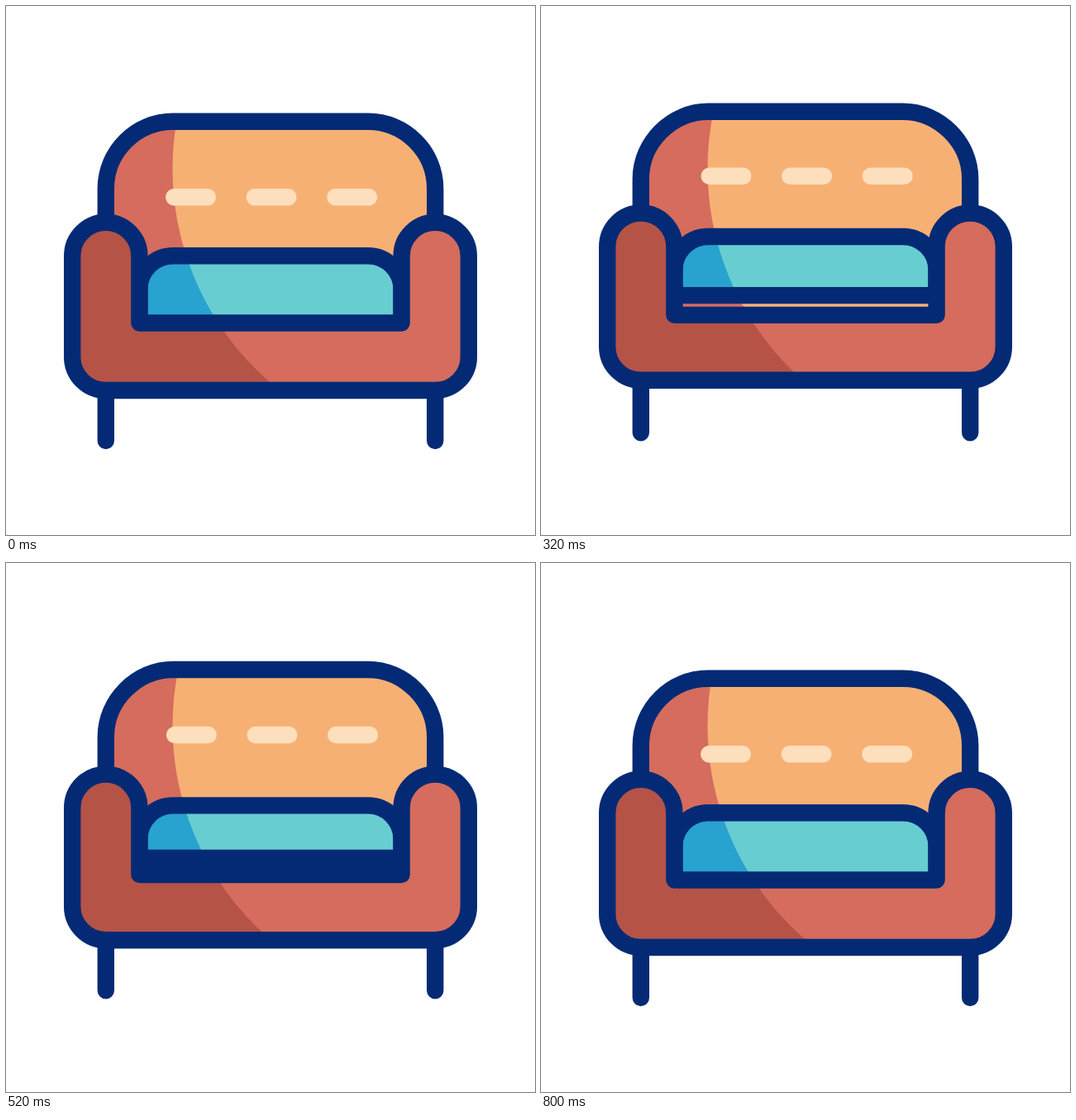
An HTML page for the animation above (1.48 s loop, 640 px wide and 640 px high).

```html
<!DOCTYPE html>
<html lang="en">
<head>
<meta charset="utf-8">
<title>Jumping sofa</title>
<style>
  html, body { margin: 0; width: 100%; height: 100%; overflow: hidden; background: #fff; }
  svg { display: block; width: 100%; height: 100%; }
  .line { fill: none; stroke: #042a75; stroke-width: 20.4; stroke-linejoin: round; stroke-linecap: round; }
  .dash, .spark { fill: none; stroke: #fddfbd; stroke-width: 20.4; stroke-linecap: round; }
  .spark { stroke: #ffca50; }
  .lit { clip-path: url(#light); }
</style>
</head>
<body>
<svg viewBox="0 0 640 640">
  <defs>
    <clipPath id="light"><circle cx="543.5" cy="197" r="342"/></clipPath>
  </defs>
  <path id="legs" class="line"/>
  <g id="back">
    <path fill="#d56c5d"/><path class="lit" fill="#f7b074"/><path class="line"/>
  </g>
  <path id="dashes" class="dash" d="M203.2 0H243.8M300.8 0H341.4M398.4 0H439"/>
  <g id="cushion">
    <path fill="#28a2cf"/><path class="lit" fill="#67cdd1"/><path class="line"/>
  </g>
  <g id="body">
    <path fill="#b55347"/><path class="lit" fill="#d56c5d"/><path class="line"/>
  </g>
  <path id="sparkL" class="spark"/>
  <path id="sparkR" class="spark"/>
</svg>
<script>
const LOOP = 1480, STEP = 40;
const R = 40.6, BACK_R = 81.3;
const LEFT = 80.2, RIGHT = 559.8;
const $ = id => document.getElementById(id);

// The jump eases from rest through crouch, peak and landing back to rest
const BEATS = [120, 200, 400, 645, 800];

// Rest position, then the offset at crouch, peak and landing
const parts = {
  back:    [139.8, 23, -30.6, 10.2],
  arm:     [261.8, 27.2, -31.6, 20.9],
  rail:    [383.6, 28.4, -29.9, 18.4],
  base:    [465, 20, -29.2, 13],
  cushTop: [302.2, 28.4, -50.5, 35.7],
  cushLow: [383.6, 28, -66, 15.2],
  dash:    [231.3, 10.2, -44.4, -0.9],
  dashX:   [0, 0, 0.8, 1],
  foot:    [526, 0, -15, -2.2]
};

const clamp = x => Math.min(1, Math.max(0, x));
const ease = u => (1 - Math.cos(Math.PI * clamp(u))) / 2;

function place([rest, ...offsets], t) {
  const poses = [0, ...offsets, 0];
  let y = rest;
  for (let i = 1; i < BEATS.length; i++) {
    y += (poses[i] - poses[i - 1]) * ease((t - BEATS[i - 1]) / (BEATS[i] - BEATS[i - 1]));
  }
  return y;
}

function setShape(id, d) {
  for (const path of $(id).children) path.setAttribute('d', d);
}

// Tab with round upper corners, symmetric about the middle of the stage
function tab(left, top, bottom, r, bend = 0.552) {
  const right = 640 - left, h = r * (1 - bend);
  return `M${left} ${bottom}V${top + r}
    C${left} ${top + h} ${left + h} ${top} ${left + r} ${top}H${right - r}
    C${right - h} ${top} ${right} ${top + h} ${right} ${top + r}V${bottom}`;
}

// Line that grows outward, then follows its own tip away
function setSpark(id, x0, y0, x1, y1, t) {
  const head = clamp((t - 600) / 100), tail = clamp((t - 680) / 100);
  const at = p => `${x0 + (x1 - x0) * p} ${y0 + (y1 - y0) * p}`;
  $(id).setAttribute('d', head > 0 && tail < 1 ? `M${at(tail)}L${at(head)}` : '');
}

function draw(t) {
  const p = {};
  for (const name in parts) p[name] = place(parts[name], t);

  $('legs').setAttribute('d', `M120.8 ${p.base}V${p.foot}M519.2 ${p.base}V${p.foot}`);

  // The corners of the back flatten a little as it rises
  const lift = Math.max(0, parts.back[0] - p.back);
  setShape('back', tab(120.8, p.back, p.rail, BACK_R, 0.552 - lift / 1000));

  $('dashes').setAttribute('transform', `translate(${p.dashX} ${p.dash})`);
  setShape('cushion', tab(LEFT + 2 * R, p.cushTop, p.cushLow, R) + 'Z');

  const turn = `a${R} ${R} 0 0 1`;
  setShape('body', `M${LEFT} ${p.arm + R}${turn} ${2 * R} 0V${p.rail}
    H${RIGHT - 2 * R}V${p.arm + R}${turn} ${2 * R} 0V${p.base - R}
    ${turn} ${-R} ${R}H${LEFT + R}${turn} ${-R} ${-R}Z`);

  setSpark('sparkL', 87.6, 523.3, 30.2, 500.6, t);
  setSpark('sparkR', 554.2, 523.5, 600, 500.9, t);
}

const start = performance.now();
function tick() {
  const t = (performance.now() - start) % LOOP;
  draw(Math.floor(t / STEP) * STEP);
  requestAnimationFrame(tick);
}
tick();
</script>
</body>
</html>
```
